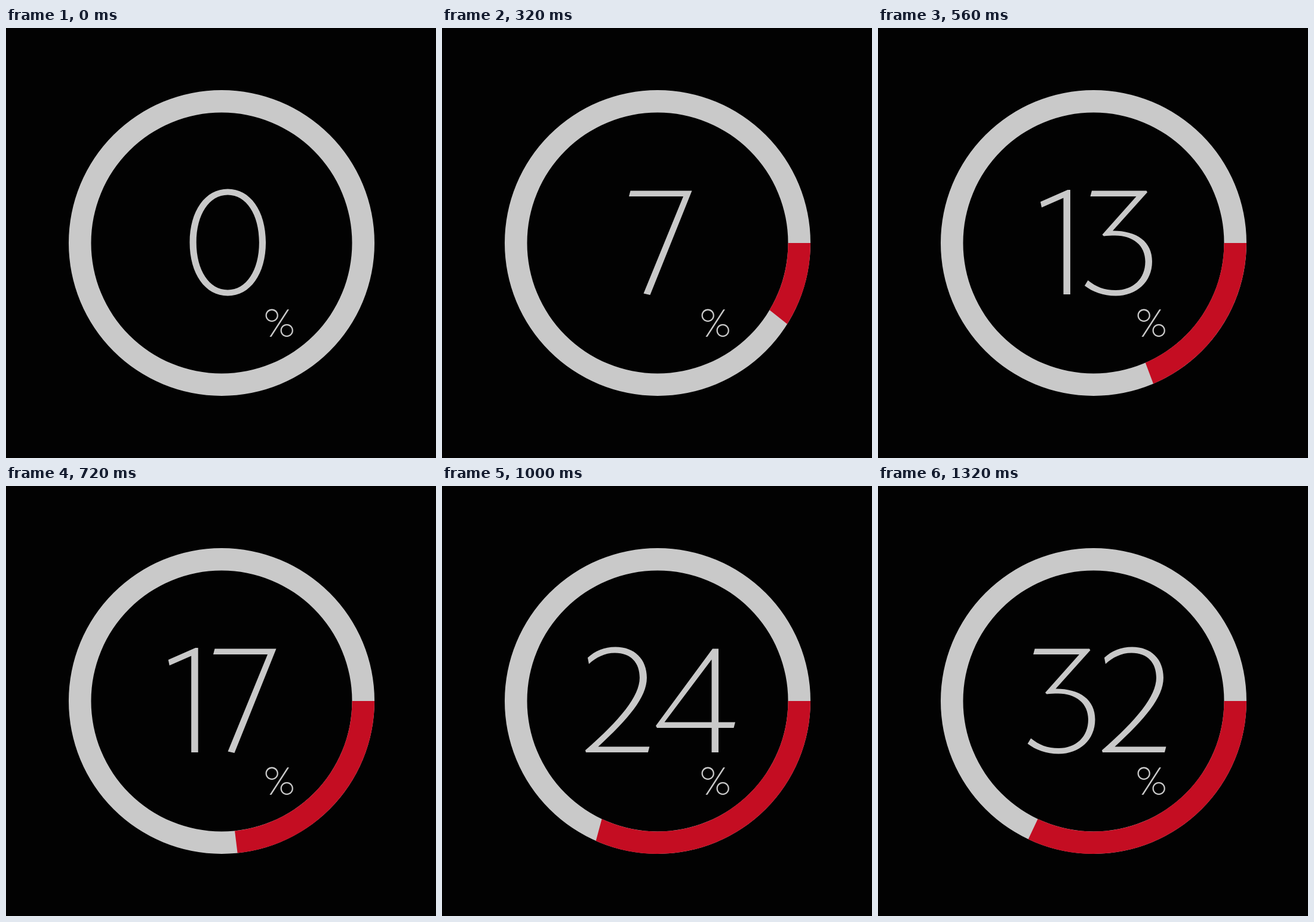
Recreate the animation shown at these times as an HTML page with a canvas. Size 720x720 px, loop 4080 ms.

```html
<!DOCTYPE html>
<html lang="en">
<head>
<meta charset="utf-8">
<title>Percentage ring</title>
<style>
  html, body { margin: 0; height: 100%; overflow: hidden; background: #020202; }
  canvas { display: block; }
</style>
</head>
<body>
<canvas id="stage" width="720" height="720" role="img"></canvas>
<script>
const canvas = document.getElementById('stage');
const ctx = canvas.getContext('2d');

const LOOP = 4080, STEP = 40, LAST = 32;
const CX = 361, CY = 360, OUTER = 256, INNER = 218.5;
const GREY = '#c9c9c9', RED = '#c40d22', BLACK = '#020202';
const TEXT_CENTER = 371.3;

// Sweep of the red arc in degrees: [count, inner edge, outer edge]
const SWEEP = [
  [0, 0, 0], [7, 30.9, 32], [13, 66.6, 67], [20, 97.4, 96.8],
  [24, 115.3, 113.8], [25, 115.3, 115.3]
];

function oval(cx, cy, rx, ry, k = 0.56) {
  const hx = rx * k, hy = ry * k;
  const l = cx - rx, r = cx + rx, t = cy - ry, b = cy + ry;
  return `M${cx} ${t}C${cx + hx} ${t} ${r} ${cy - hy} ${r} ${cy}` +
    `C${r} ${cy + hy} ${cx + hx} ${b} ${cx} ${b}` +
    `C${cx - hx} ${b} ${l} ${cy + hy} ${l} ${cy}` +
    `C${l} ${cy - hy} ${cx - hx} ${t} ${cx} ${t}Z`;
}

const loop = (cx, cy, rx, ry, wx, wy, k) =>
  oval(cx, cy, rx, ry, k) + oval(cx, cy, rx - wx, ry - wy, k);

const glyph = (advance, bearing, ...outlines) =>
  ({ advance, bearing, paths: outlines.map(d => new Path2D(d)) });

const nine = 'M121.5 328C121.5 351 112 369 97 391L57.5 447.5L45 445L96.5 376' +
  'C87 383 74 387 60 387C24.5 387 0 363 0 330C0 295 24.5 269.5 61 269.5' +
  'C97.5 269.5 121.5 294 121.5 328Z' + oval(60.5, 328.5, 49.3, 49);

// Digits with ink starting at x = 0 and y in stage coordinates
const DIGITS = [
  glyph(143, 7.75, loop(63.75, 359, 63.75, 89.5, 11.2, 10, 0.59)),
  glyph(68, -4.3, 'M0 291L45.5 271H50V446H38.5V284.5L2 300.5Z'),
  glyph(123, 4.15,
    'M4 287.5C16.5 276 31.5 269.5 50.5 269.5C82.5 269.5 103 290 103 321' +
    'C103 354 72 390 21.5 436.5H107.5L105 446H1L0 442.5C58 392 91 352 91 321' +
    'C91 296 76.5 279.5 49.5 279.5C32.5 279.5 18 287 6 298Z'),
  glyph(122, 1.7,
    'M12 272.5H103.5L105 275L47 339.5C88 339.5 113 358 113 391' +
    'C113 425 87 448.5 52 448.5C31 448.5 13 441.5 0 431.5L5.5 422.5' +
    'C19 433.5 33 439 52 439C81 439 101.5 420 101.5 391' +
    'C101.5 364 81 347.5 51 347.5C44 347.5 38 347.8 32 348.5L29.5 346L86.5 282H9.5Z'),
  glyph(148, -0.8,
    'M95 272.5H105V395.5H133L130.5 405H105V446H93.5V405H2L0 401.5Z' +
    'M93.5 290.5V395.5H14.5Z'),
  glyph(124, 5,
    'M19 272.5H101L98.5 282H29L25 341C34 337.5 43 336 53 336' +
    'C86 336 109 358 109 391C109 425 84 448.5 49 448.5C30 448.5 13 441 0 429' +
    'L6.5 421.5C19 433 33 439 49 439C78 439 97.5 420 97.5 391' +
    'C97.5 363 78 345.5 50 345.5C38 345.5 28 348 19.5 352L13.5 349Z'),
  glyph(136, 7),
  glyph(122.6, 3, 'M2.5 272.5H105.5L35.5 447L24.5 444.5L91 282H0Z'),
  glyph(136, 8, loop(60, 312.3, 52, 42.8, 11.2, 10), loop(60, 396.5, 60, 52, 11.2, 10)),
  glyph(136, 7.7, nine)
];

// Six is nine turned upside down
const six = new Path2D();
six.addPath(new Path2D(nine), new DOMMatrix([-1, 0, 0, -1, 121.5, 718]));
DIGITS[6].paths.push(six);

const PERCENT = [
  loop(445.2, 481.3, 10.7, 10.7, 2.3, 2.3),
  loop(470.2, 506.5, 10.7, 10.7, 2.3, 2.3),
  'M471 471.3H474L444.4 517H441.4Z'
].map(d => new Path2D(d));

function band(innerEnd, outerEnd, color) {
  ctx.beginPath();
  ctx.arc(CX, CY, OUTER, 0, outerEnd);
  ctx.lineTo(CX + INNER * Math.cos(innerEnd), CY + INNER * Math.sin(innerEnd));
  ctx.arc(CX, CY, INNER, innerEnd, 0, true);
  ctx.closePath();
  ctx.fillStyle = color;
  ctx.fill();
}

function sweepAt(count) {
  const i = SWEEP.findIndex(key => key[0] >= count);
  if (i < 0) return SWEEP[SWEEP.length - 1].slice(1);
  if (i === 0) return [0, 0];
  const a = SWEEP[i - 1], b = SWEEP[i];
  const f = (count - a[0]) / (b[0] - a[0]);
  return [1, 2].map(j => a[j] + (b[j] - a[j]) * f);
}

function drawNumber(count) {
  const digits = [...String(count)].map(c => DIGITS[c]);
  let x = TEXT_CENTER - digits.reduce((sum, d) => sum + d.advance, 0) / 2;
  ctx.fillStyle = GREY;
  for (const d of digits) {
    ctx.save();
    ctx.translate(x + d.bearing, 0);
    d.paths.forEach(p => ctx.fill(p, 'evenodd'));
    ctx.restore();
    x += d.advance;
  }
}

function draw(count) {
  ctx.fillStyle = BLACK;
  ctx.fillRect(0, 0, 720, 720);
  band(Math.PI * 2, Math.PI * 2, GREY);
  if (count > 0) {
    const [inner, outer] = sweepAt(count).map(deg => deg * Math.PI / 180);
    band(inner, outer, RED);
  }
  drawNumber(count);
  PERCENT.forEach(p => ctx.fill(p, 'evenodd'));
  canvas.setAttribute('aria-label', count + '%');
}

const start = performance.now();
let shown = -1;

function tick() {
  const t = (performance.now() - start) % LOOP;
  const count = Math.min(LAST, Math.max(0, Math.floor(t / STEP) - 1));
  if (count !== shown) draw(shown = count);
  requestAnimationFrame(tick);
}
tick();
</script>
</body>
</html>
```
